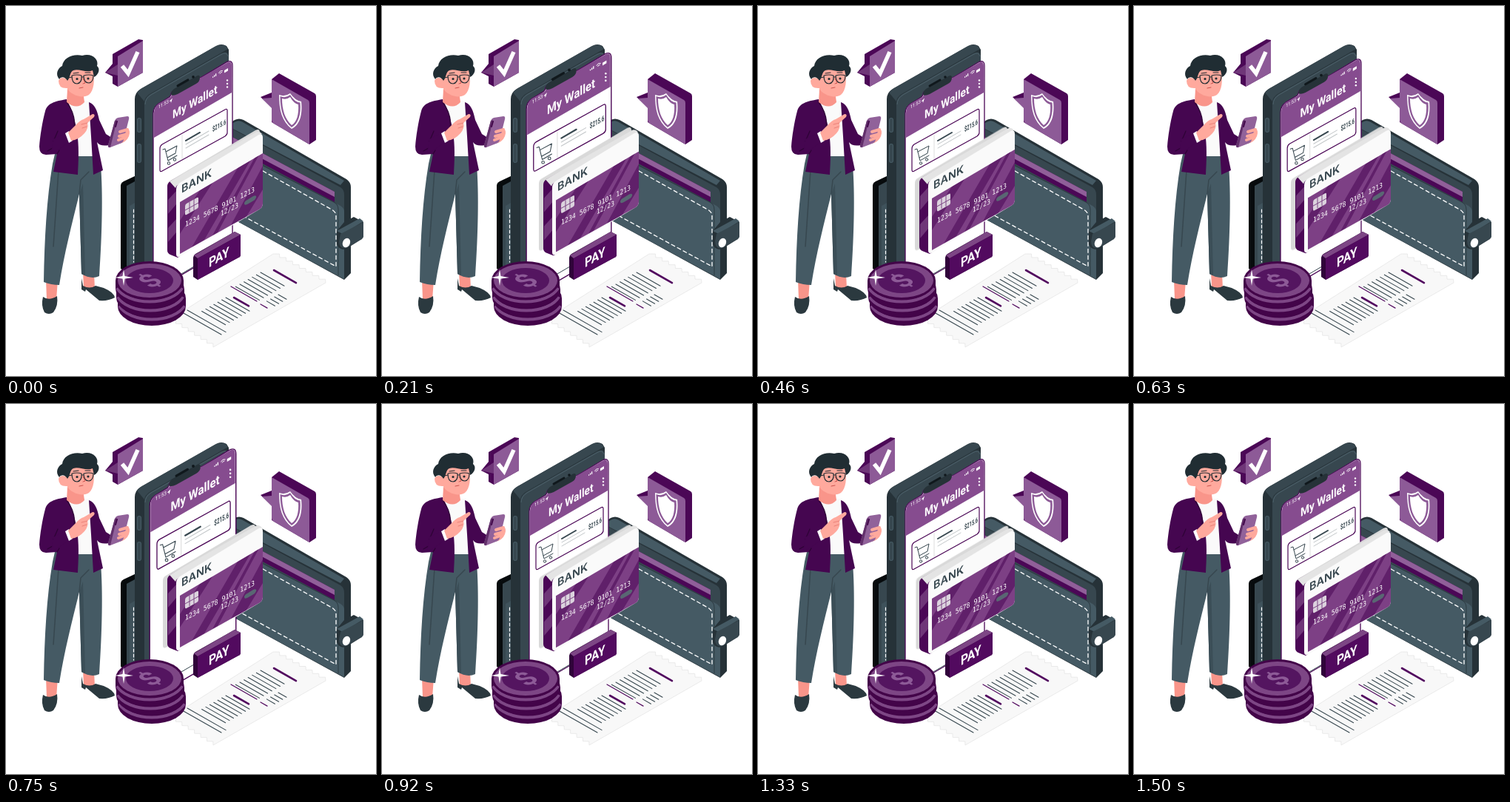
An HTML page for the animation above (1.54 s loop, 500 by 500 pixels).

```html
<!DOCTYPE html>
<html lang="en">
<head>
<meta charset="utf-8">
<title>My Wallet</title>
<style>
html, body { margin: 0; width: 100%; height: 100%; overflow: hidden; background: #fff; }
svg { display: block; width: 100vw; height: 100vh; }
text { font-family: Roboto, Inter, sans-serif; font-weight: 600; }
.num { font-family: "DejaVu Sans Mono", monospace; font-weight: 400; fill: #fff; }
.line { fill: none; stroke-linecap: round; stroke-linejoin: round; }
#screen { transform-origin: 253px 230px; }
</style>
</head>
<body>
<svg viewBox="0 0 500 500">
  <defs>
    <clipPath id="cardArea"><path d="M235 265 347 199V267Q347 272 342 275L235 335Z"/></clipPath>
    <g id="coin">
      <path d="M-46 0V11A46 26 0 0 0 46 11V0Z" fill="#430449"/>
      <path d="M-44 10A46 26 0 0 0 44 10" fill="none" stroke="#7d4685" stroke-width="4"/>
      <ellipse rx="46" ry="26" fill="#430449"/>
      <ellipse rx="43" ry="23" fill="#7d4685"/>
    </g>
  </defs>
  <rect width="500" height="500" fill="#fff"/>

  <!-- wallet -->
  <path d="M155 243Q155 239 159 237L176 229V366L155 355Z" fill="#070b0d"/>
  <path d="M163 243 176 236V364L163 357Z" fill="#37474f"/>
  <path d="M167 270 176 265V364L167 359Z" fill="#3f525b"/>
  <path class="line" d="M172.500 275V346" stroke="#fff" stroke-width="1.200" stroke-dasharray="4 3"/>
  <path d="M300 160 309 154Q315 151 321 154L460 234Q466 238 466 245V361L457 370 300 284Z" fill="#263238"/>
  <path d="M303 160 311 156Q315 154 320 157L457 236 452 242 303 164Z" fill="#455a64"/>
  <path d="M300 163 452 245Q457 248 457 255V369L300 284Z" fill="#37474f"/>
  <path d="M300 174 444 251V265L300 188Z" fill="#4b0756"/>
  <path d="M300 174 444 251V258L300 182Z" fill="#905f99"/>
  <path d="M300 192 452 270Q457 273 457 278V369L300 284Z" fill="#455a64"/>
  <path d="M300 192 340 212 443 265Q449 268 449 275V364" fill="none" stroke="#2c3a41"/>
  <path class="line" d="M308 201 440 275Q446 278 446 284V352L308 277" stroke="#fff" stroke-width="1.300" stroke-dasharray="5 4"/>
  <path d="M457 292 470 285 483 292V310Q483 314 479 316L460 328Q451 331 447 322V304Z" fill="#263238"/>
  <path d="M447 304 478 287 483 291 455 308Z" fill="#455a64"/>
  <path d="M452 308 483 292V310Q483 314 479 316L460 327Q450 329 450 318Z" fill="#37474f"/>
  <ellipse cx="460" cy="320" rx="5" ry="6.500" fill="#fff" transform="rotate(22 460 320)"/>

  <!-- phone body -->
  <path d="M174 126Q174 117 182 112L284 54Q291 50 298 54L301 59V316L193 378Q174 374 174 359Z" fill="#263238"/>
  <path d="M177 117Q179 114 184 111L284 54Q291 51 297 54L300 58 194 119Q188 123 187 129Z" fill="#37474f"/>
  <path d="M187 133Q187 124 195 119L291 64Q301 59 301 70V318L198 378Q187 380 187 370Z" fill="#37474f"/>
  <path d="M188 133Q188 125 196 120L290 66Q298 61 300 68" fill="none" stroke="#4d616b"/>
  <path class="line" d="M180 154V168M180 189V209" stroke="#465b65" stroke-width="6"/>
  <path class="line" d="M180 154V168M180 189V209" stroke="#37474f" stroke-width="4"/>

  <!-- receipt -->
  <g id="receipt"></g>

  <!-- phone screen -->
  <g id="screen">
    <path d="M199 145Q199 137 206 132L221 123Q223 121 223 119 224 115 227 115L231 118 253 105Q259 102 259 98 260 96 263 97L298 76Q306 72 306 81V323L205 382Q199 385 199 378Z" fill="#fff" stroke="#4b0756" stroke-width="1.300"/>
    <path d="M200 145Q200 137 206 132L221 124Q224 122 224 119L227 116Q228 120 232 118L254 105Q259 102 260 98L263 97 298 77Q305 73 305 81V117L200 178Z" fill="#864c8f"/>
    <path d="M223 120Q223 115 227 112L257 95Q262 92 262 97 262 102 257 105L232 119Q226 122 223 120Z" fill="#263238"/>
    <path class="line" d="M232 108 246 100" stroke="#10181c" stroke-width="3"/>
    <circle cx="253" cy="96" r="1.800" fill="#10181c"/>
    <g fill="#fff">
      <text transform="matrix(.866 -.5 0 1 206 139)" font-size="6.400" style="font-weight:400">11:53</text>
      <path d="M220.500 129 225 124.500 223 131 222.500 128.500Z"/>
      <text transform="matrix(.866 -.5 0 1 225 152.500)" font-size="15.800">My Wallet</text>
      <path d="M279 97V95.500L280.200 95V96.500ZM281 96V93.500L282.200 93V95.500ZM283 95V91.500L284.200 91V94.500ZM295 87 300 84V87.500L295 90.500Z"/>
      <circle cx="299" cy="100.500" r="1.200"/><circle cx="299" cy="105" r="1.200"/><circle cx="299" cy="109.500" r="1.200"/>
    </g>
    <path class="line" d="M287.500 90.500Q289.500 86.500 292.500 87.500M289 91.500Q290 89.500 291.500 89.500" stroke="#fff" stroke-width=".9"/>
    <path class="line" d="M208 193Q208 189 211 187L296 140Q299 138 299 142V171Q299 174 296 176L211 223Q208 225 208 221Z" stroke="#4b0756" stroke-width="1.200"/>
    <path d="M238 174V207" stroke="#ddd"/>
    <g class="line" stroke="#37474f">
      <path d="M212 194 215 193 219 209 231 202M216 197 231 189 229 199 218 205" stroke-width="1"/>
      <circle cx="220" cy="212.500" r="1.700"/><circle cx="228" cy="207.500" r="1.700"/>
      <path d="M243 182 262 171" stroke-width="2"/>
      <path d="M243 187 274 169M243 192 274 174" stroke="#c4c8ca" stroke-width="1"/>
    </g>
    <text transform="matrix(.6 -.34 0 1 279 170)" font-size="9.600" fill="#37474f">$215.6</text>
  </g>

  <!-- bank card -->
  <path id="plate" d="M218 243Q218 238 222 236L337 168Q343 165 343 171V265L222 333Q218 335 218 330Z" fill="#d9d9d9"/>
  <g id="card">
    <path d="M218 244Q218 239 223 236L337 175 344 260 232 340 222 336Q218 334 218 330Z" fill="#4b0756"/>
    <path d="M219 262 230 250V268L219 281ZM219 300 230 288V306L219 319Z" fill="#6f3678"/>
    <path d="M221 237 337 171Q342 168 346 173L235 240Q230 242 229 246Z" fill="#e4e4e4"/>
    <path d="M230 248Q230 242 235 239L340 175Q347 171 347 178V267Q347 272 342 275L236 338Q230 341 230 335Z" fill="#fafafa"/>
    <g clip-path="url(#cardArea)">
      <path d="M230 190H350V350H230Z" fill="#7d4085"/>
      <path d="M235 290 262 249 279 239 235 308ZM251 326 313 219 330 209 268 316ZM279 310 336 205 342 201 286 306ZM304 296 347 216V248L324 286Z" fill="#5b1a66" opacity=".85"/>
    </g>
    <text transform="matrix(.96 -.54 0 1 237 253)" font-size="15" fill="#37474f" style="font-family:Inter,sans-serif">BANK</text>
    <path d="M242 271Q242 268 244 267L258 259Q260 258 260 260V271Q260 273 258 274L244 282Q242 283 242 281Z" fill="#dcd3de"/>
    <path d="M242 276 260 266M248 265V279M254 261V276" stroke="#7d4685" fill="none"/>
    <text class="num" transform="matrix(.866 -.44 0 1 242 298.500)" font-size="9.500">1234 5678 9101 1213</text>
    <text class="num" transform="matrix(.866 -.44 0 1 290 284)" font-size="9.200">12/23</text>
    <path d="M322 267Q322 264 326 262L334 257Q339 255 338 259 337 262 333 264L326 268Q322 270 322 267Z" fill="#596773"/>
  </g>

  <!-- pay button -->
  <path class="line" d="M237 362 254 352" stroke="#37474f"/>
  <path d="M253 340Q253 337 256 335L309 305 317 309V336Q317 339 314 340L259 370 253 366Z" fill="#30033a"/>
  <path d="M254 337 309 305 317 309 259 341Z" fill="#7d4685"/>
  <path d="M259 341 317 309V336Q317 339 314 340L259 370Z" fill="#520a5f"/>
  <text transform="matrix(.866 -.5 0 1 274 353.500)" font-size="18" fill="#fff">PAY</text>

  <!-- coins -->
  <use href="#coin" x="197" y="395"/>
  <use href="#coin" x="195" y="383"/>
  <use href="#coin" x="194" y="371"/>
  <ellipse cx="194" cy="371" rx="32" ry="17" fill="#541560"/>
  <text transform="matrix(.866 -.5 .866 .5 194 371)" y="12.500" text-anchor="middle" font-size="35" fill="#8d5a97">$</text>
  <path d="M159 356 160.500 365 172 367 160.500 368.500 159 378 157.500 368.500 147 367 157.500 365Z" fill="#fff"/>

  <!-- check bubble -->
  <path d="M144 65 179 45 185 46V90L151 109 144 105V95L134 90 144 78Z" fill="#4b0756"/>
  <path d="M151 68 185 47V90L151 109Z" fill="#8d5a97"/>
  <path d="M134 90 151 79V94Z" fill="#6f3678"/>
  <path d="M157 81 165 91 178 62" fill="none" stroke="#fff" stroke-width="5.500"/>

  <!-- shield bubble -->
  <path d="M359 99 369 91 417 118Q419 119 419 122V181L410 187 359 157Z" fill="#4b0756"/>
  <path d="M344 123 359 117V137Z" fill="#4b0756"/>
  <path d="M359 99 408 127Q410 128 410 131V187L362 159Q359 157 359 154V138L346 125 359 124Z" fill="#8d5a97"/>
  <path d="M384 118Q391 128 399 129C401 147 397 161 386 166 373 156 369 141 369 120Q377 123 384 118Z" fill="#fff"/>
  <path d="M384 120Q390 130 397.500 130.500C399 147 395 159 386 164 375 155 370.500 141 370.500 122Q378 125 384 120Z" fill="#8d5a97"/>
  <path d="M384 123Q389 132 395 133C396 146 393 157 386 161 377 153 373 140 373 125Q379 127 384 123Z" fill="#fff"/>

  <!-- man -->
  <path d="M54 370H70L68 397H55ZM104 358 119 360 120 383 105 382Z" fill="#f9958a"/>
  <path d="M50 393Q58 399 69 392 71 405 64 414 58 418 52 414 47 405 50 393ZM102 368 104 378Q113 383 121 378L132 381Q146 387 147 394 138 399 126 398L108 383 107 386 102 383Z" fill="#2b393f"/>
  <path d="M66 200H122L128 215C131 255 130 305 126 365Q115 370 102 362L99 254C89 295 79 333 72 377Q61 377 51 373C52 314 55 260 63 213Z" fill="#455a64"/>
  <path class="line" d="M99 254 101 235 112 224M71 222 64 325" stroke="#37474f" stroke-width="1.500"/>
  <path d="M99 254 104 240 107 364 102 362Z" fill="#3b4e57"/>
  <path d="M82 128H114L120 203 94 203Z" fill="#fafafa"/>
  <path d="M112 130C120 133 123 140 126 154L135 173 143 178 139 188Q127 190 123 184L131 222 118 228 115 176Z" fill="#450650"/>
  <path d="M82 126C64 129 56 132 53 142 49 157 46 176 45 190Q45 201 54 201L69 200 64 224 97 228C99 195 100 162 82 126Z" fill="#450650"/>
  <path class="line" d="M82 130C96 149 94 166 87 178L56 196M70 169 64 183M69 200 72 195" stroke="#2e0336" stroke-width="1.300"/>
  <path d="M64 180 81 171 87 183 61 200Z" fill="#450650"/>
  <path d="M80 172 85 169 90 182 85 185Z" fill="#fff"/>
  <path d="M84 171 96 159Q101 154 105 153L117 146Q121 146 119 150L110 158Q112 165 106 172 98 181 88 182Z" fill="#ffa99d"/>
  <path class="line" d="M102 160 110 158M103 165 109 163" stroke="#e47870" stroke-width=".8"/>
  <path d="M150 168 161 164Q168 166 167 172 166 181 157 185L145 187Z" fill="#ffa99d"/>
  <path d="M147 155Q148 152 151 151L164 149Q167 149 166 153L159 181Q158 185 154 186L141 191Q137 192 138 188Z" fill="#91629a"/>
  <path d="M147 155 138 188Q138 191 141 191L150 154Z" fill="#62306b"/>
  <path class="line" d="M150 156 148 163" stroke="#430a4c" stroke-width="2"/>
  <path class="line" d="M154 170 164 167M153 176 164 173M152 181 160 178" stroke="#ffa99d" stroke-width="4"/>
  <path d="M83 112 104 115 106 130Q96 141 82 130Z" fill="#f9958a"/>
  <path d="M81 83Q98 75 118 86C120 101 119 114 112 120 104 126 87 120 83 112Z" fill="#ffa99d"/>
  <path d="M83 99Q74 94 71 101 71 112 83 111Z" fill="#ffa99d"/>
  <path d="M72 99C66 92 70 84 76 81 77 70 91 64 103 67 116 63 126 72 123 81 128 85 125 93 119 96L117 87C109 91 98 84 91 87 86 89 87 97 83 101 80 95 74 95 72 99Z" fill="#202d33"/>
  <g class="line" stroke="#202d33">
    <path d="M89 94Q96 92 102 94 103 104 96 105 89 105 89 94ZM105 94Q112 92 118 94 118 103 112 104 105 104 105 94ZM102 96 105 96M84 97 89 96" stroke-width="1.200"/>
    <path d="M91 91 98 90M107 90 114 90" stroke-width="1.200"/>
    <path d="M104 98 107 104 104 105M99 111 104 110" stroke="#c9544f"/>
  </g>
  <circle cx="96" cy="98.500" r="1.600" fill="#202d33"/><circle cx="111" cy="98" r="1.600" fill="#202d33"/>
</svg>
<script>
const el = id => document.getElementById(id);
const LOOP = 1540;

// Receipt: zigzag short ends, rows of printed lines
const zigzag = (x0, y0, x1, y1, n) => {
  let d = "";
  for (let i = 0; i <= n * 2; i++) {
    const k = i / (n * 2), lift = i % 2 ? 4 : 0;
    d += ` ${x0 + (x1 - x0) * k + lift} ${y0 + (y1 - y0) * k - lift * 0.6}`;
  }
  return d;
};
const rule = (x, y, len, color = "#37474f", w = 1.1) =>
  `<path class="line" d="M${x} ${y}l${len} ${len * 0.57}" stroke="${color}" stroke-width="${w}"/>`;
const rows = (x, y, len, n, dx) =>
  Array.from({ length: n }, (_, i) => rule(x - dx * i, y + dx * 0.57 * i, len)).join("");
const plum = "#520a5f";
el("receipt").innerHTML =
  `<path d="M${zigzag(361, 335, 432, 374, 8)} L${zigzag(280, 461, 221, 424, 7)}Z" fill="#f8f8f8" stroke="#e3e3e3" stroke-width=".7"/>` +
  rule(362, 357, 30, plum, 2.6) + rows(344, 360, 32, 7, 5.6) +
  rule(304, 379, 35, plum, 1.2) + rule(308, 394, 20, plum, 2.6) +
  rows(368, 390, 11, 4, 5.2) + rule(344, 403, 9, plum, 1.2) +
  rows(297, 394, 32, 7, 5.4) + rows(245, 411, 52, 2, 6);

const play = (id, steps) => el(id).animate(
  steps.map(([ms, props, easing = "linear"]) => ({ ...props, easing, offset: ms / LOOP })),
  { duration: LOOP, iterations: Infinity });
const scale = s => ({ transform: `scale(${s})` });
const move = (x, y) => ({ transform: `translate(${x}px, ${y}px)` });
const rise = "cubic-bezier(.39,.575,.565,1)", fall = "cubic-bezier(.47,0,.745,.715)";

play("screen", [
  [0, scale(1)], [150, scale(1.09)], [450, scale(1)],
  [600, scale(1)], [750, scale(1.09)], [900, scale(1)], [LOOP, scale(1)]
]);
play("card", [
  [0, move(0, 0), rise], [750, move(0, -6), fall], [1500, move(0, 0)], [LOOP, move(0, 0)]
]);
play("plate", [
  [0, move(0, 0), "ease-out"], [220, move(-6, -3)], [750, move(-6, -4)],
  [1200, move(-6, -3), "ease-in"], [1500, move(0, 0)], [LOOP, move(0, 0)]
]);
</script>
</body>
</html>
```
